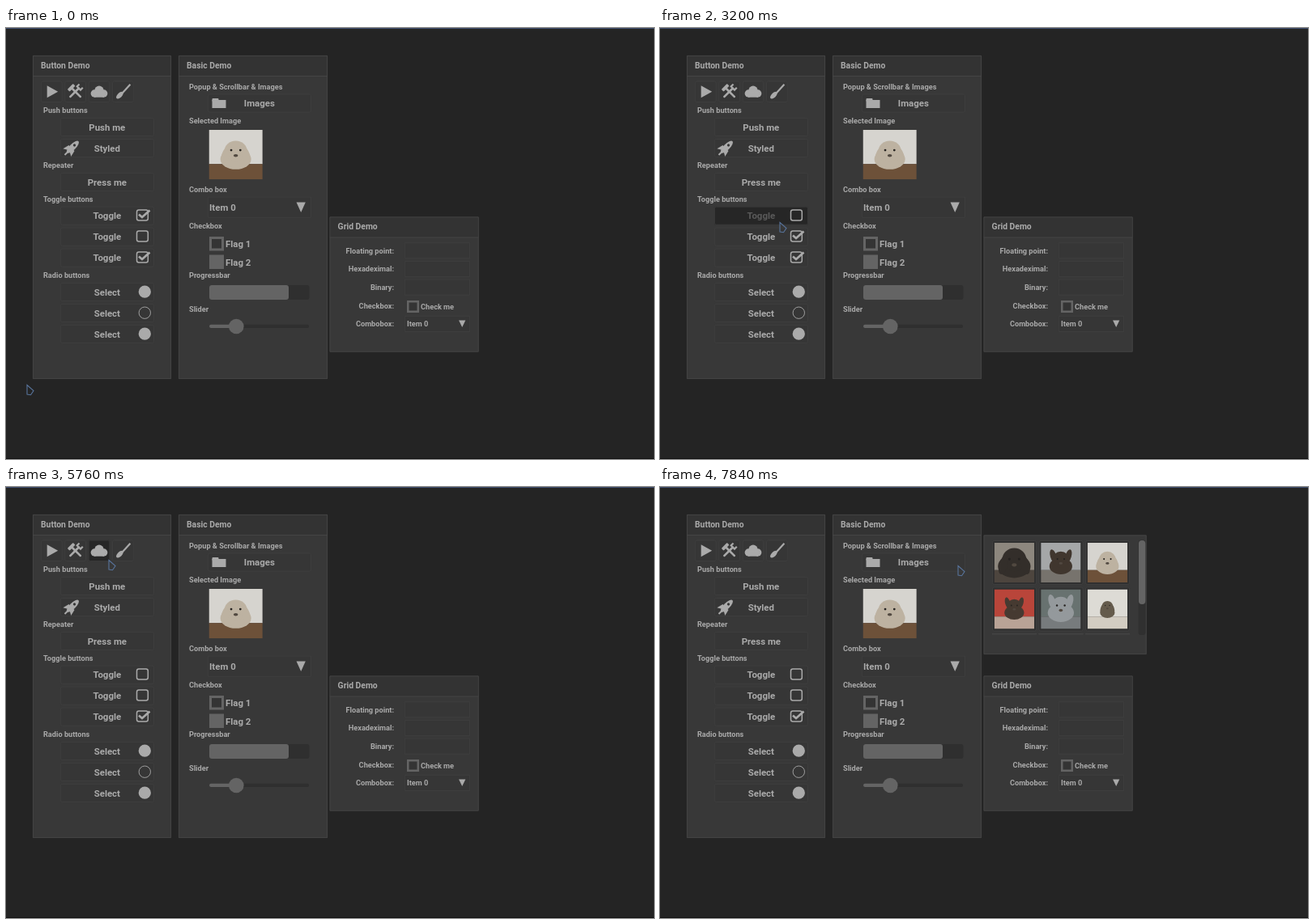
Recreate the animation shown at these times as an HTML page with a canvas. Size 800x533 px, loop 8000 ms.

```html
<!DOCTYPE html>
<html lang="en">
<head>
<meta charset="utf-8">
<title>Widget demo</title>
<style>
html, body { margin: 0; width: 100%; height: 100%; overflow: hidden; background: #242424; }
canvas { display: block; }
</style>
</head>
<body>
<canvas id="stage" width="800" height="533"></canvas>
<script>
const c = document.getElementById('stage').getContext('2d');
const STEP = 160, LOOP = 8000, TAU = Math.PI * 2;
const BIG = 11.45, TITLE = 10.35, SMALL = 9.2;
const INK = '#aaaaaa', PANEL = '#383838', BUTTON = '#363636', EDGE = '#414141', DARK = '#262626', GREY = '#646464', WELL = '#2f2f2f';

// Pointer stops: [step, x, y]
const PATH = [
  [0, 25, 441], [7, 150, 372], [9, 167, 349], [10, 161, 334], [11, 160, 332], [15, 165, 353],
  [18, 154, 261], [20, 147, 240], [22, 146, 261], [26, 85, 120], [28, 64, 81], [31, 75, 107],
  [34, 75, 107], [38, 177, 73], [41, 203, 110], [43, 203, 110], [48, 367, 97], [50, 367, 97]
];
const CLICKS = [9, 10, 12, 15, 18, 20, 22];
let step = 0, popup = '';

const within = (a, b) => step >= a && step < b;

function pointer(s) {
  const i = Math.max(1, PATH.findIndex(p => p[0] >= s));
  const [a, x0, y0] = PATH[i - 1], [b, x1, y1] = PATH[i], f = (s - a) / (b - a);
  return [x0 + (x1 - x0) * f, y0 + (y1 - y0) * f];
}

function over(x, y, w, h, s = step) {
  const [px, py] = pointer(s);
  return px >= x && px < x + w && py >= y && py < y + h;
}

function fill(x, y, w, h, color, r = 0) {
  c.fillStyle = color;
  c.beginPath();
  c.roundRect(x, y, w, h, r);
  c.fill();
}

function outline(x, y, w, h, color, r = 0, width = .8) {
  c.strokeStyle = color;
  c.lineWidth = width;
  c.beginPath();
  c.roundRect(x, y, w, h, r);
  c.stroke();
}

function frame(x, y, w, h, bg, edge = EDGE, r = 0) {
  fill(x, y, w, h, bg, r);
  outline(x + .4, y + .4, w - .8, h - .8, edge, r);
}

function text(s, x, y, size = SMALL, align = 'left', color = INK) {
  c.font = `bold ${size}px Roboto, sans-serif`;
  c.textAlign = align;
  c.fillStyle = color;
  c.fillText(s, x, y + size * .355);
}

function trace(points) {
  c.beginPath();
  for (let i = 0; i < points.length; i += 2) c.lineTo(points[i], points[i + 1]);
}

function poly(...points) {
  c.fillStyle = INK;
  trace(points);
  c.fill();
}

function line(width, ...points) {
  c.strokeStyle = INK;
  c.lineWidth = width;
  trace(points);
  c.stroke();
}

function oval(x, y, rx, ry = rx, color = INK, turn = 0) {
  c.fillStyle = color;
  c.beginPath();
  c.ellipse(x, y, rx, ry, turn, 0, TAU);
  c.fill();
}

function at(x, y, draw, turn = 0, sx = 1, sy = sx) {
  c.save();
  c.translate(x, y);
  c.rotate(turn);
  c.scale(sx, sy);
  draw();
  c.restore();
}

function panel(title, x, y, w, h) {
  frame(x, y, w, h, PANEL, '#484848');
  fill(x + 1, y + 1, w - 2, 24.5, '#333333');
  fill(x, y + 25, w, 1, '#454545');
  text(title, x + 10, y + 12, TITLE);
}

function button(x, y, w, h, label, textX) {
  const hot = !popup && over(x, y, w, h);
  frame(x, y, w, h, hot ? DARK : BUTTON, EDGE, 2);
  if (label) text(label, textX, y + h / 2, BIG, 'center', !hot ? INK : CLICKS.includes(step) ? '#5a5a5a' : '#777777');
}

// A labelled button that flips its mark with every click that lands on it
function flipButton(y, label, on, mark) {
  const hits = CLICKS.filter(s => s <= step && over(67, y, 116, 23, s)).length;
  button(67, y, 116, 23, label, 124.8);
  mark(y + 11.2, on !== (hits % 2 > 0));
}

function check(y, on) {
  outline(161.5, y - 6.8, 13.8, 13, INK, 2.5, 1.5);
  if (on) line(2.7, 164, y - 1.5, 168, y + 2, 177.5, y - 6.5);
}

function radio(y, on) {
  if (on) oval(171.3, y, 7.6);
  else outline(164.1, y - 7.2, 14.4, 14.4, INK, 7.2, .9);
}

// Small icons, each centred on 0,0
const icon = {
  play() { poly(-5.5, -7.5, 8, 0, -5.5, 7.5); },
  tools() {
    for (const side of [-1, 1]) at(0, 0, () => {
      fill(-1.3, -7, 2.6, 17, INK, 1);
      if (side < 0) fill(-5, -9, 10, 4, INK, 1);
      else line(2.2, -3, -10, -3, -6, 3, -6, 3, -10);
    }, side * TAU / 8);
  },
  cloud() {
    for (const side of [-1, 0, 1]) oval(side * 5.7, side ? 2.3 : -1.5, side ? 4.7 : 5.6);
    fill(-6, 1, 12, 6, INK);
  },
  brush() { line(2.2, 9, -9, -1, 2); oval(-4, 4.5, 5.5, 2.8, INK, -TAU / 8); },
  rocket() {
    at(0, 0, () => {
      oval(0, -2, 3.8, 10);
      poly(-7, 8, -5, 0, 5, 0, 7, 8, 0, 4);
      fill(-1, 6, 2, 6, INK);
      oval(0, -5, 1.6, 1.6, BUTTON);
    }, TAU / 8);
  },
  stop() { fill(-5, -5, 10, 10, INK, 1.5); },
  pause() { for (const x of [-3.5, 1]) fill(x, -4.5, 2.6, 9, INK); },
  next() {
    for (const x of [-6, -1]) poly(x, -5, x + 5.5, 0, x, 5);
    fill(4, -5, 2, 10, INK);
  },
  copy() { for (const d of [-5, 0]) outline(d, d / 2 - 2.5, 5, 8, INK, 1, 1); },
  cross() { for (const d of [-3.2, 3.2]) line(2.6, -d, -3.2, d, 3.2); },
  convert() { outline(-5, -4, 9, 9, INK, 0, 1.1); line(2.6, -2, 2, 1, -1); poly(0, -5, 6, -1, 0, 3); },
  edit() { outline(-5, -4, 9, 9, INK, 1, 1.1); line(2.2, -2, 2, 5, -5); }
};

// [backdrop, ground, fur, head size, ear direction: -1 up, 1 down]
const PICTURES = {
  dog: ['#8d877e', '#4d453e', '#332e2a', 20, 1],
  wild: ['#a5a7a8', '#77736d', '#40362e', 14, -1],
  rabbit: ['#d6d4cf', '#6d5139', '#bdb2a1', 14, 1],
  cat: ['#b9453a', '#b9a396', '#463a31', 12, -1],
  cub: ['#687270', '#777b7d', '#94999c', 16, -1],
  turtle: ['#dddbd5', '#d3cdc2', '#655b4c', 9, 1]
};

function photo(name, x, y, w, h) {
  const [backdrop, ground, fur, size, ears] = PICTURES[name];
  c.save();
  c.beginPath();
  c.rect(x, y, w, h);
  c.clip();
  at(x, y, () => {
    fill(0, 0, 66, 42, backdrop);
    fill(0, 42, 66, 19, ground);
    oval(33, 36, size * 1.35, size * .9, fur);
    oval(33, 26, size, size * .9, fur);
    for (const side of [-1, 1]) {
      oval(33 + side * size * .9, 26 + ears * size * .4, size * .35, size * .75, fur, -side * ears * .3);
      oval(33 + side * size * .4, 25, size * .1, size * .1, '#252220');
    }
    oval(33, 26 + size * .4, size * .2, size * .13, '#514840');
  }, 0, w / 66, h / 61);
  c.restore();
}

function menu(x, y, h, firstRow, items) {
  frame(x, y, 80, h, '#333333', EDGE);
  items.forEach(([label, name, scale = 1, turn = 0], i) => {
    const row = firstRow + i * 19.4, hot = over(x, row - 9.7, 80, 19.4);
    if (hot) fill(x + 1, row - 9, 78, 18, DARK);
    at(x + 10.8, row, icon[name], turn, scale);
    text(label, x + 39.5, row, SMALL, 'center', hot ? '#777777' : INK);
  });
}

function buttonDemo() {
  panel('Button Demo', 33, 34, 171, 400);
  ['play', 'tools', 'cloud', 'brush'].forEach((name, i) => {
    const x = 43 + i * 29.4;
    button(x, 65.5, 26.5, 26.5);
    if (name === popup) fill(x + .5, 66, 25.5, 25.5, DARK, 2);
    at(x + 13.2, 78.7, icon[name]);
  });
  text('Push buttons', 46, 101.5);
  button(67, 111, 116, 23, 'Push me', 124.8);
  button(67, 137, 116, 23, 'Styled', 124.8);
  at(81, 148.5, icon.rocket);
  text('Repeater', 46, 169.5);
  button(67, 179, 116, 23, 'Press me', 124.8);
  text('Toggle buttons', 46, 211.5);
  text('Radio buttons', 46, 305.5);
  for (let i = 0; i < 3; i++) {
    flipButton(220.7 + i * 26, 'Toggle', i !== 1, check);
    flipButton(315 + i * 26, 'Select', i !== 1, radio);
  }
}

function basicDemo() {
  panel('Basic Demo', 213, 34, 184, 400);
  text('Popup & Scrollbar & Images', 226, 72.5);
  button(249, 81.5, 128, 23, 'Images', 312.8);
  fill(254.5, 87, 8, 4, INK, 1);
  fill(254.5, 89, 17, 10, INK);
  text('Selected Image', 226, 114.5);
  photo('rabbit', 250.5, 126, 66.3, 61.3);
  text('Combo box', 226, 199.5);
  frame(249, 208.7, 128, 26, BUTTON);
  text('Item 0', 251, 222, BIG);
  poly(358.5, 215.5, 369.8, 215.5, 364.2, 228);
  text('Checkbox', 226, 244.5);
  for (let i = 0; i < 2; i++) {
    fill(251, 258 + i * 22.5, 18, 17.5, GREY);
    text('Flag ' + (i + 1), 271, 267 + i * 22.5, BIG);
  }
  fill(254, 261, 12, 11.5, '#343434');
  text('Progressbar', 226, 306);
  fill(251, 318, 123.5, 18, WELL, 3);
  fill(251, 318, 98, 18, GREY, 3);
  text('Slider', 226, 348);
  fill(251, 366.7, 123, 4.3, WELL, 2);
  fill(251, 366.7, 33, 4.3, GREY, 2);
  oval(284.3, 369, 9.3, 9.3, GREY);
}

function gridDemo() {
  panel('Grid Demo', 399.6, 233.6, 184, 167);
  ['Floating point:', 'Hexadeximal:', 'Binary:', 'Checkbox:', 'Combobox:'].forEach((label, i) => {
    const y = 275.3 + i * 22.65;
    text(label, 479, y, SMALL, 'right');
    if (i !== 3) frame(492, y - 10, 81, 20, BUTTON);
  });
  fill(495, 337, 15, 15, GREY);
  fill(497.5, 339.5, 10, 10, '#343434');
  text('Check me', 512, 344.5);
  text('Item 0', 495, 366);
  poly(559, 361.5, 567.3, 361.5, 563.2, 370);
}

function gallery() {
  frame(399.6, 59.5, 201, 147.5, PANEL, '#484848');
  Object.keys(PICTURES).forEach((name, i) => {
    const x = 410 + i % 3 * 57.5, y = 66 + Math.floor(i / 3) * 57.5;
    frame(x, y, 55, 55, '#303030', '#444444', 2);
    photo(name, x + 2.7, y + 3, 49.3, 49);
    fill(x, 181, 55, 1.2, '#444444');
  });
  fill(590.5, 65.5, 9, 117.5, '#303030', 3);
  fill(591, 66, 8.3, 79, GREY, 4);
}

function cursor() {
  at(...pointer(step), () => {
    trace([1, .5, 9, 7.5, 5.5, 12.7, 1, 12]);
    c.closePath();
    c.strokeStyle = '#58749c';
    c.lineWidth = 1.1;
    c.stroke();
  });
}

function draw(now) {
  step = Math.floor(now % LOOP / STEP);
  popup = within(30, 34) ? 'play' : within(38, 43) ? 'context' : step >= 49 ? 'gallery' : '';
  fill(0, 0, 800, 533, '#242424');
  fill(0, 0, 800, 1, '#3f4f70');
  fill(0, 532, 800, 1, '#101010');
  buttonDemo();
  basicDemo();
  gridDemo();
  if (popup === 'play') menu(43, 94, 103, 106.2, [
    ['Play', 'play', .58], ['Stop', 'stop', .95], ['Pause', 'pause'], ['Next', 'next'], ['Prev', 'next', 1, Math.PI]
  ]);
  if (popup === 'context') menu(177, 73, 86.5, 87.7, [
    ['Clone', 'copy'], ['Delete', 'cross'], ['Convert', 'convert'], ['Edit', 'edit']
  ]);
  if (popup === 'gallery') gallery();
  cursor();
}

const start = performance.now();
function tick() {
  draw(performance.now() - start);
  requestAnimationFrame(tick);
}
tick();
</script>
</body>
</html>
```
